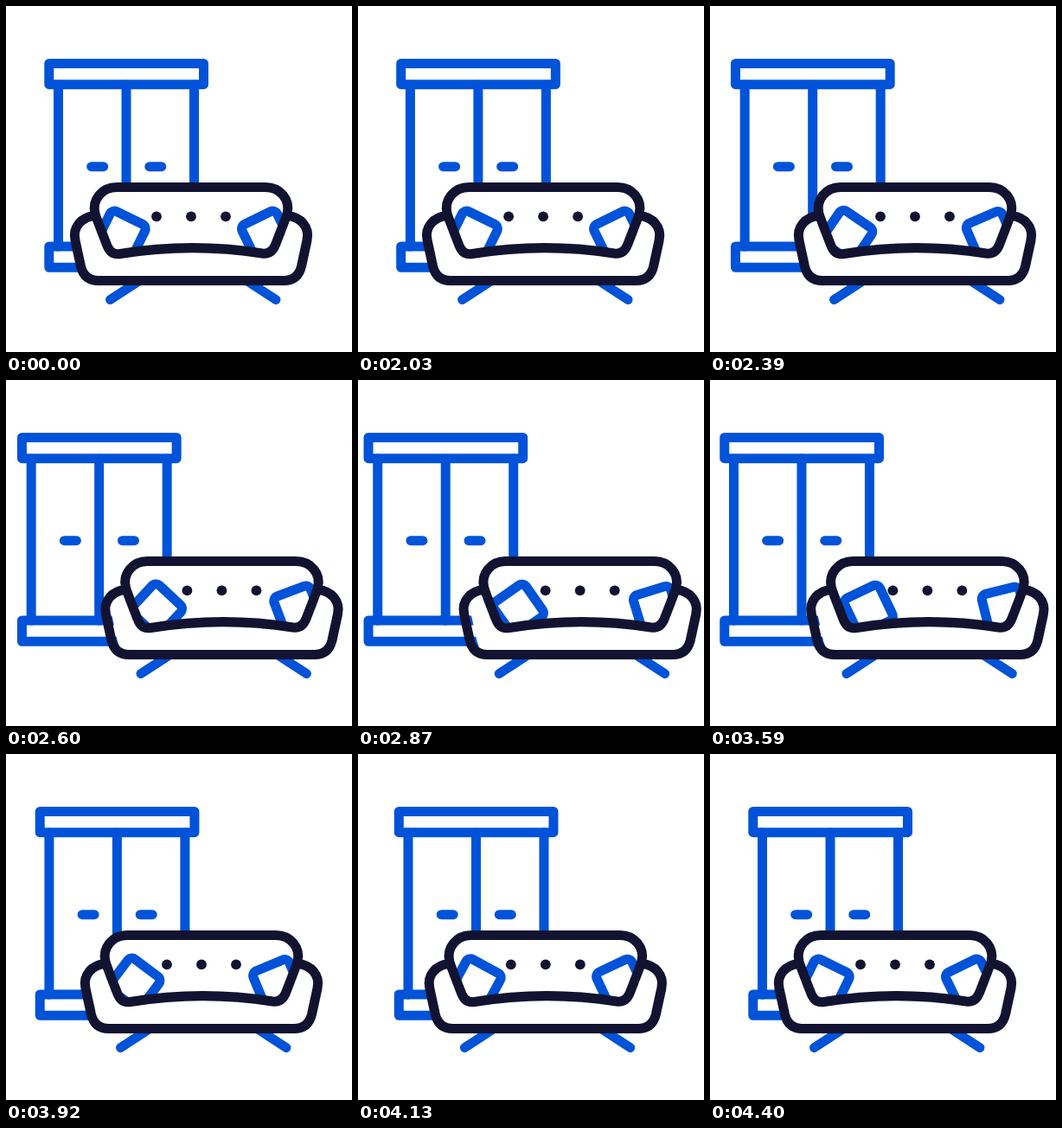
These frames come from a looping animation (400x400 px, 4.43 s). An HTML page with a canvas:

```html
<!DOCTYPE html>
<html lang="en">
<head>
<meta charset="utf-8">
<title>Wardrobe and sofa</title>
<style>
  html, body { margin: 0; width: 100%; height: 100%; overflow: hidden; background: #fff; }
  canvas { display: block; width: 400px; height: 400px; }
</style>
</head>
<body>
<canvas id="stage"></canvas>
<script>
const BLUE = '#0053d8', DARK = '#121331', WHITE = '#fff';
const LOOP = 4430, HOLD = 2000, STEP = 30, LAST = 80;

const canvas = document.getElementById('stage');
const ctx = canvas.getContext('2d');
const ratio = window.devicePixelRatio || 1;
canvas.width = canvas.height = Math.round(400 * ratio);

const body = new Path2D(
  'M102 242.5 C88 244 76.5 255 80 271 L86.5 301 Q90.5 317.5 107 317.5 ' +
  'H321 Q337.5 317.5 341.5 301 L348 271 C351.5 255 340 244 326 242.5');
const back = new Path2D(
  'M128 209.5 H300 C317 209.5 329 224 325 240 Q324 244 311.5 276 ' +
  'Q307 287.5 296 286 Q214 273 132 286.5 Q121 288.5 116.5 276 ' +
  'Q104 244 103 240 C99 224 111 209.5 128 209.5 Z');

// Bezier easing with flat ends: y follows smoothstep, x is shaped by x1 and x2.
function ease(t, x1, x2) {
  if (t <= 0) return 0;
  if (t >= 1) return 1;
  let lo = 0, hi = 1, s;
  for (let i = 0; i < 24; i++) {
    s = (lo + hi) / 2;
    const x = 3 * s * (1 - s) ** 2 * x1 + 3 * s * s * (1 - s) * x2 + s ** 3;
    if (x < t) lo = s; else hi = s;
  }
  return s * s * (3 - 2 * s);
}

function swing(step, peak, out, home) {
  return step < peak
    ? ease(step / peak, ...out)
    : 1 - ease((step - peak) / (LAST - peak), ...home);
}

function at(x, y, draw) {
  ctx.save();
  ctx.translate(x, y);
  draw();
  ctx.restore();
}

function line(x1, y1, x2, y2) {
  ctx.beginPath();
  ctx.moveTo(x1, y1);
  ctx.lineTo(x2, y2);
  ctx.stroke();
}

function wardrobe() {
  ctx.strokeStyle = BLUE;
  for (const x of [60.5, 139, 217.5]) line(x, 91, x, 278);
  ctx.strokeRect(49.8, 66.5, 178.7, 24.2);
  ctx.strokeRect(49.8, 278, 178.7, 24.3);
  line(98.7, 185.7, 112.7, 185.7);
  line(165.8, 185.7, 179.8, 185.7);
}

function pillow(x, y, degrees) {
  at(x, y, () => {
    ctx.rotate(degrees * Math.PI / 180);
    ctx.beginPath();
    ctx.roundRect(-22.5, -22.5, 45, 45, 6);
    ctx.stroke();
  });
}

function sofa(roll) {
  ctx.strokeStyle = BLUE;
  line(120.5, 339.5, 152, 319);
  line(312, 339.5, 280.5, 319);

  ctx.save();
  ctx.clip(back);
  pillow(133.1 + 14 * roll, 265.2, 26 + 42 * roll);
  pillow(300.6 + 2.5 * roll, 265.2, -26 + 13 * roll);
  ctx.restore();

  ctx.strokeStyle = ctx.fillStyle = DARK;
  ctx.stroke(body);
  ctx.stroke(back);
  for (const x of [174, 214, 254]) {
    ctx.beginPath();
    ctx.arc(x, 243.3, 5.9, 0, Math.PI * 2);
    ctx.fill();
  }
}

function render(now) {
  const time = now % LOOP;
  const step = Math.max(0, Math.floor((time - HOLD) / STEP));
  const slide = swing(step, 40, [0.3, 0.22], [0.574, 0.405]);
  const roll = swing(step, 46, [0.33, 0.67], [0.5, 0.28]);

  ctx.setTransform(ratio, 0, 0, ratio, 0, 0);
  ctx.fillStyle = WHITE;
  ctx.fillRect(0, 0, 400, 400);
  ctx.lineWidth = 11;
  ctx.lineCap = ctx.lineJoin = 'round';

  at(-39.8 * slide, 0, wardrobe);
  // The cover hiding the wardrobe travels slightly further than the sofa.
  at(53.5 * slide, 0, () => {
    ctx.fillStyle = WHITE;
    ctx.fill(body);
    ctx.fill(back);
  });
  at(45 * slide, 0, () => sofa(roll));
}

const start = performance.now();
function tick() {
  render(performance.now() - start);
  requestAnimationFrame(tick);
}
tick();
</script>
</body>
</html>
```
